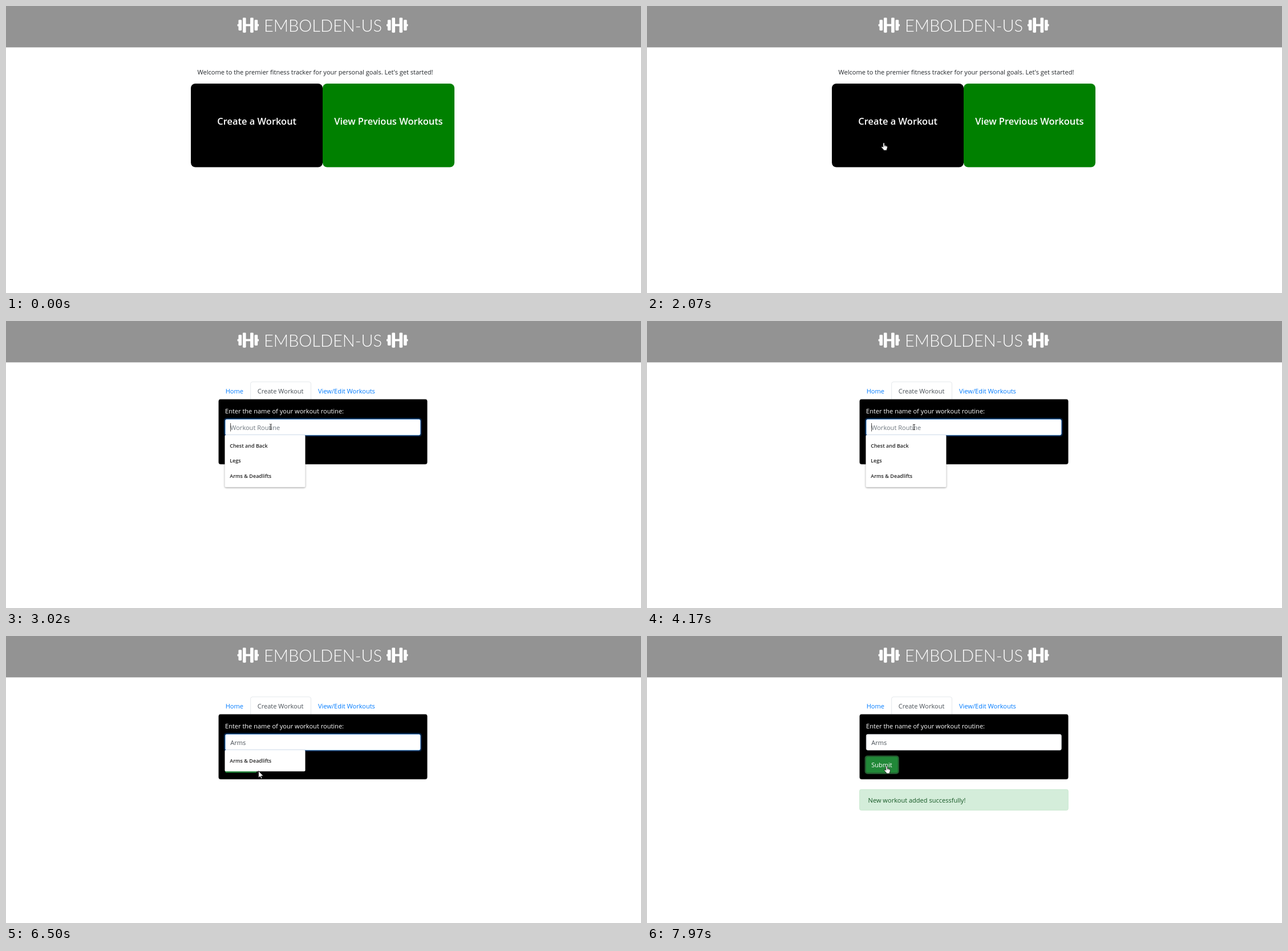
These frames come from a looping animation (1113x503 px, 8 s). An HTML page:

```html
<!DOCTYPE html>
<html lang="en">
<head>
<meta charset="utf-8">
<title>Fitness tracker</title>
<style>
  html, body { margin: 0; width: 100%; height: 100%; overflow: hidden; background: #fff; }
  svg { display: block; width: 100%; height: 100%; font: 11.05px "Open Sans", "Noto Sans", sans-serif; }
  .title { font: 300 29px Lato, sans-serif; fill: #fff; text-anchor: middle; }
  .big { font-size: 16.48px; font-weight: 600; fill: #fff; text-anchor: middle; }
  .link { fill: #007bff; }
  .light { fill: #fff; }
  #list text { font-size: 9px; font-weight: 600; fill: #222; }
  #list.shadow rect { filter: drop-shadow(0 1px 1.5px #0006); }
</style>
</head>
<body>
<svg viewBox="0 0 1113 503">
  <defs>
    <g id="dumbbell" fill="#fff">
      <rect y="224" width="60" height="64" rx="8"/>
      <rect x="580" y="224" width="60" height="64" rx="8"/>
      <rect x="32" y="96" width="96" height="320" rx="24"/>
      <rect x="512" y="96" width="96" height="320" rx="24"/>
      <rect x="160" y="32" width="96" height="448" rx="24"/>
      <rect x="384" y="32" width="96" height="448" rx="24"/>
      <rect x="240" y="224" width="160" height="64"/>
    </g>
  </defs>

  <rect width="1113" height="72.5" fill="#939393"/>
  <use href="#dumbbell" transform="translate(405.6 18.5) scale(.0586)"/>
  <use href="#dumbbell" transform="translate(667 18.5) scale(.0586)"/>
  <text class="title" x="555.5" y="45">EMBOLDEN-US</text>

  <g id="home">
    <text x="335.6" y="120" fill="#212529">Welcome to the premier fitness tracker for your personal goals. Let's get started!</text>
    <rect x="324" y="136" width="231" height="146.5" rx="8"/>
    <rect x="555" y="136" width="231" height="146.5" rx="8" fill="#008000"/>
    <text class="big" x="439.7" y="208">Create a Workout</text>
    <text class="big" x="670.4" y="208">View Previous Workouts</text>
  </g>

  <g id="form">
    <path d="M428.7 137V110q0-3.3 3.3-3.3h99.2q3.3 0 3.3 3.3V137" fill="#fff" stroke="#dee2e6" stroke-width=".8"/>
    <text class="link" x="384.7" y="126.5">Home</text>
    <text x="440.7" y="126.5" fill="#495057">Create Workout</text>
    <text class="link" x="547" y="126.5">View/Edit Workouts</text>
    <rect x="372.8" y="137.3" width="365.4" height="113.6" rx="3.2" stroke="#444" stroke-width=".7"/>
    <text class="light" x="384" y="162">Enter the name of your workout routine:</text>
    <rect id="ring" x="381.8" y="169.8" width="347" height="32.8" rx="5" fill="#001f40"/>
    <rect id="input" x="384.3" y="172.3" width="342" height="27.8" rx="2.8" fill="#fff" stroke-width=".8"/>
    <text id="value" x="393.2" y="191"></text>
    <path id="caret" d="M0 179v14.5" stroke="#333" stroke-width=".9"/>
    <rect id="glow" x="381.6" y="209.4" width="60.2" height="32.6" rx="5" fill="#245a30"/>
    <rect id="button" x="384" y="211.8" width="55.6" height="27.8" rx="2.8"/>
    <text class="light" x="393.2" y="230">Submit</text>
    <g id="alert">
      <rect x="372.6" y="269" width="365.6" height="36.3" rx="2.8" fill="#d4edda" stroke="#c3e6cb" stroke-width=".8"/>
      <text x="387.6" y="291.5" fill="#155724">New workout added successfully!</text>
    </g>
    <g id="list">
      <rect id="sheet" x="383.5" y="199.7" width="141" rx="2" fill="#fff"/>
      <text id="first" x="392.2" y="221.8"></text>
      <g id="rest">
        <text x="392.2" y="248.3">Legs</text>
        <text x="392.2" y="274.8">Arms &amp; Deadlifts</text>
      </g>
    </g>
  </g>

  <g id="cursor">
    <path id="arrow" d="M0 0V12L2.8 9.5 4.6 13.6 6.4 12.8 4.6 8.8H8.5Z" fill="#fff" stroke="#000" stroke-width=".8"/>
    <g id="hand" stroke="#000" stroke-width=".7">
      <path d="M-1.2 .4Q0 -1 1.2 .4V4.4Q3 3.8 4 5Q6.4 5 6.4 7Q6.5 9.5 5.3 11V13H-.6V11.6L-4 8Q-4.4 6 -2.8 6.2L-1.2 7.6Z" fill="#fff"/>
      <path d="M1.2 4.4V7M3 4.7V7.2M4.7 5.3V7.4" stroke-width=".4" fill="none"/>
    </g>
    <path id="beam" d="M-2 -4.6H-.6L0 -4 .6 -4.6H2M0 -4V4M-2 4.6H-.6L0 4 .6 4.6H2" fill="none" stroke="#222" stroke-width="1"/>
  </g>
</svg>
<script>
const $ = id => document.getElementById(id);
const show = (id, on) => { $(id).style.display = on ? '' : 'none'; };
const set = (id, name, value) => $(id).setAttribute(name, value);

const LOOP = 8000, OPEN = 2230, FOCUS = 2940, BLUR = 6506, HOVER = 6822, PRESS = 7050, DONE = 7280;

// Pointer moves: first step, last step, number of steps, destination
const START = [1150, 538];
const MOVES = [
  [670, 1060, 6, 353, 245],
  [1220, 1297, 2, 376, 253],
  [1373, 1450, 2, 401, 246],
  [1610, 1830, 4, 416, 240],
  [1990, 1990, 1, 413, 232],
  [2070, 2070, 1, 415, 240],
  [2540, 3020, 7, 464, 185.5],
  [3100, 3170, 2, 468, 186],
  [5490, 5650, 3, 469, 186.5],
  [6190, 6506, 5, 436, 249],
  [6585, 6900, 5, 416, 231],
  [7970, 7970, 1, 420, 228]
];
const TYPING = [[4800, 'A'], [5180, 'Ar'], [5260, 'Arm'], [5490, 'Arms']];

function pointer(t) {
  let [x, y] = START;
  for (const [from, to, steps, nx, ny] of MOVES) {
    if (t < from) break;
    const gap = (to - from) / Math.max(1, steps - 1);
    const k = gap ? Math.min(steps, Math.floor((t - from) / gap + 1.01)) : 1;
    x += (nx - x) * k / steps;
    y += (ny - y) * k / steps;
  }
  return [x, y];
}

function shape(t, x, y, listOpen) {
  const inside = (l, top, r, b) => x >= l && x <= r && y >= top && y <= b;
  if (t < OPEN) return inside(324, 136, 786, 282) ? 'hand' : 'arrow';
  if (inside(384, 172, 727, 200)) return 'beam';
  return !listOpen && inside(384, 211, 440, 240.5) ? 'hand' : 'arrow';
}

function draw(t) {
  const focused = t >= FOCUS && t < BLUR;
  const typed = TYPING.filter(([at]) => t >= at).pop();
  const text = typed ? typed[1] : '';

  show('home', t < OPEN);
  show('form', t >= OPEN);

  show('ring', focused);
  set('input', 'stroke', focused ? '#80bdff' : '#ced4da');
  $('value').textContent = text || 'Workout Routine';
  set('value', 'fill', text ? '#495057' : '#6c757d');

  const blink = t - (typed ? typed[0] : FOCUS);
  show('caret', focused && Math.floor(blink / 530) % 2 === 0);
  const end = text ? $('value').getComputedTextLength() : 0;
  set('caret', 'transform', `translate(${393.6 + end} 0)`);

  show('list', focused);
  show('rest', !text);
  set('sheet', 'height', text ? 37.6 : 91.6);
  $('first').textContent = text ? 'Arms & Deadlifts' : 'Chest and Back';
  $('list').setAttribute('class', text === 'Ar' ? '' : 'shadow');

  const hover = Math.min(1, Math.max(0, (t - HOVER) / 150));
  set('button', 'fill', `rgb(${40 - 7 * hover},${167 - 31 * hover},${69 - 13 * hover})`);
  show('glow', t >= PRESS);
  show('alert', t >= DONE);

  const [x, y] = pointer(t);
  const kind = shape(t, x, y, focused);
  for (const id of ['arrow', 'hand', 'beam']) show(id, id === kind);
  set('cursor', 'transform', `translate(${x} ${y})`);
}

const began = performance.now();
function tick() {
  draw((performance.now() - began) % LOOP);
  requestAnimationFrame(tick);
}
tick();
</script>
</body>
</html>
```
